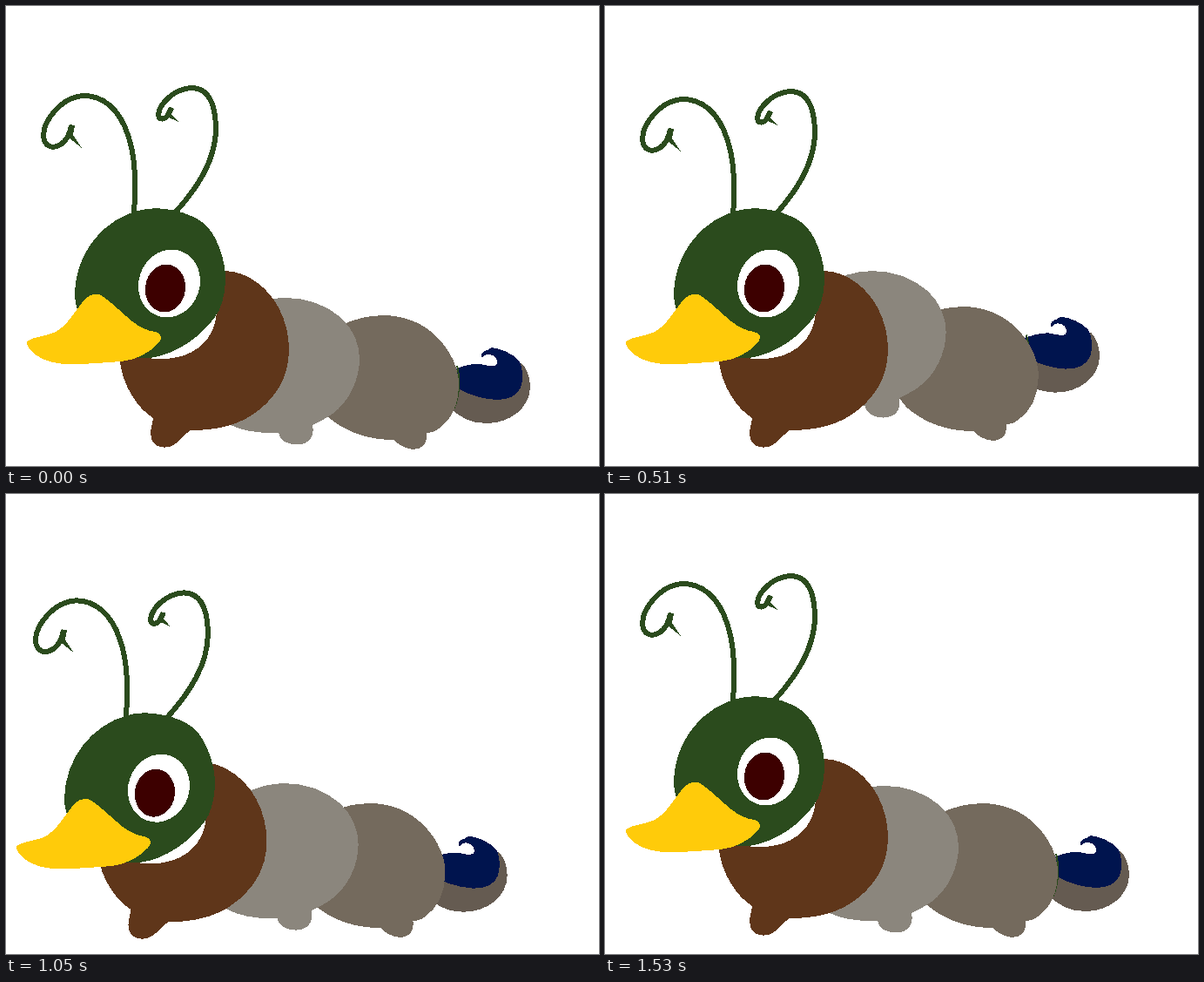
Write an HTML page that moves like this. It is 681 px wide and 528 px high and loops after 1560 ms.

```html
<!DOCTYPE html>
<html lang="en">
<head>
<meta charset="utf-8">
<title>Duck caterpillar</title>
<style>
  html, body { margin: 0; width: 100%; height: 100%; overflow: hidden; background: #fff; }
  svg { display: block; width: 100%; height: 100%; }
</style>
</head>
<body>
<svg viewBox="0 0 681 528" shape-rendering="crispEdges">
  <g id="tail">
    <path fill="#655b51" d="M505 440 L592 410 C598 416 602 426 602 437 C602 461 579 479 552 479
      C533 479 518 472 505 455 Z"/>
    <path fill="#00144e" d="M500 422 L517 416 C526 413 536 410 545 411 C552 412 557 415 563 412
      C566 407 562 401 556 400 C552 399 549 401 547 404 C544 401 547 396 553 395
      C555 394 556 392 558 392 C568 393 582 399 589 407 C594 415 594 430 591 438
      C587 447 578 452 563 452 C548 451 533 447 521 440 L505 435 Z"/>
    <path fill="none" stroke="#2b4b1d" stroke-width="2" d="M518 413 C522 428 521 448 514 463"/>
  </g>
  <path id="rear" fill="#746a5d" d="M432 355 C458 355 479 364 495 380 C513 398 521 420 520 437
    C519 460 511 475 497 485 C492 489 487 490 483 490 C484 500 481 508 468 509
    C458 508 449 503 446 498 C415 498 390 489 369 471 C356 458 348 440 348 420
    C348 390 380 356 432 355 Z"/>
  <path id="middle" fill="#8b867d" d="M322 335 C345 335 368 343 385 358 C400 372 406 390 406 405
    C406 430 393 455 375 468 C367 474 358 478 352 481 C354 490 352 503 334 503.5
    C320 503 314 497 313 490 C290 491 270 487 258 481 C240 472 232 445 232 415
    C232 375 270 335 322 335 Z"/>
  <path id="chest" fill="#5f361a" d="M250 304 C276 304 300 322 313 346 C325 369 328 394 322 418
    C316 440 300 460 275 474 C255 484 235 487 212 487 C201 494 196 507 182 506.5
    C168 507 164 495 167 483 C168 478 169 475 169 473 C150 461 135 436 131 410
    C130 360 170 304 250 304 Z"/>
  <g id="feelers" fill="none" stroke="#2b4b1d" stroke-width="6" stroke-linejoin="round">
    <path d="M147 250 C147 220 152 182 140 148 C130 117 110 103 90 103 C64 104 43 131 43 149
      C44 161 52 163 58 161 C68 158 73 148 75 137"/>
    <path d="M184 248 C222 209 242 174 241 138 C240 108 230 94 213 94 C193 95 176 112 175 125
      C176 132 183 130 186 125 L190 117"/>
    <path fill="#2b4b1d" stroke="none" d="M73 136 L79 137 L77 148 L87 163 L72 151 Z
      M187 116 L192 117 L190 124 L198 133 L185 127 Z"/>
  </g>
  <g id="head">
    <path fill="#fff" d="M242 352 C240 375 228 392 205 401 C190 406 175 406 163 404 L190 360 Z"/>
    <path fill="#2b4b1d" d="M172 232 C194 233 215 239 228 250 C242 263 253 292 252 317
      C251 333 247 348 240 357 C224 379 196 400 165 404 C118 406 80 372 79 330
      C80 277 122 233 172 232 Z"/>
    <ellipse cx="187.5" cy="318.5" rx="35" ry="39.5" transform="rotate(20 187.5 318.5)" fill="#fff"/>
    <ellipse cx="183" cy="324" rx="23" ry="27.5" transform="rotate(8 183 324)" fill="#3d0000"/>
    <path fill="#ffcb0a" d="M24 385 C30 380 45 379 55 375 C71 368 82 345 92 335
      C98 330 107 329 112 334 C122 341 133 352 145 362 C155 370 164 373 171 374
      C180 376 179 383 175 387 C165 398 150 406 133 408 C115 409 95 411 80 411
      C60 412 45 408 35 401 C28 396 23 389 24 385 Z"/>
  </g>
</svg>
<script>
const LOOP = 1560, STEP = 30, END = 1530;

// Rises 0 to 1 between a and peak, then returns to 0 at b; fall > 1 eases the return.
function tent(t, a, peak, b, fall = 1) {
  if (t <= a || t >= b) return 0;
  return t < peak ? (t - a) / (peak - a) : ((b - t) / (b - peak)) ** fall;
}

// The crawl runs from tail to head: each part is pulled left, lifted and set down.
const moves = {
  tail: t => [
    -46 * tent(t, 0, 690, END),
    -40.5 * tent(t, 0, 435, 1030) + 8 * tent(t, 1030, 1260, END)
  ],
  rear: t => [
    -29 * tent(t, 95, 635, END),
    -36.5 * tent(t, 0, 297, 590)
  ],
  middle: t => {
    const k = tent(t, 190, 635, 1080);
    return [-20 * k, -43 * k];
  },
  chest: t => [
    -31 * tent(t, 510, 948, END),
    -8.5 * tent(t, 510, 735, 948) + 5 * tent(t, 735, 948, END)
  ],
  feelers: t => [
    -13 * tent(t, 510, 920, 1350),
    5 * tent(t, 390, 540, 735) + 32 * tent(t, 540, 735, 1350) + 5 * tent(t, 735, 948, 1350)
  ],
  head: t => {
    const k = tent(t, 555, 948, END, 2.5);
    return [-19.5 * k, 31 * k];
  }
};

function draw(ms) {
  const t = Math.floor((ms % LOOP) / STEP) * STEP;
  for (const id in moves) {
    const [x, y] = moves[id](t);
    document.getElementById(id).setAttribute("transform", `translate(${x.toFixed(2)} ${y.toFixed(2)})`);
  }
}

const start = performance.now();
function tick() {
  draw(performance.now() - start);
  requestAnimationFrame(tick);
}
tick();
</script>
</body>
</html>
```
